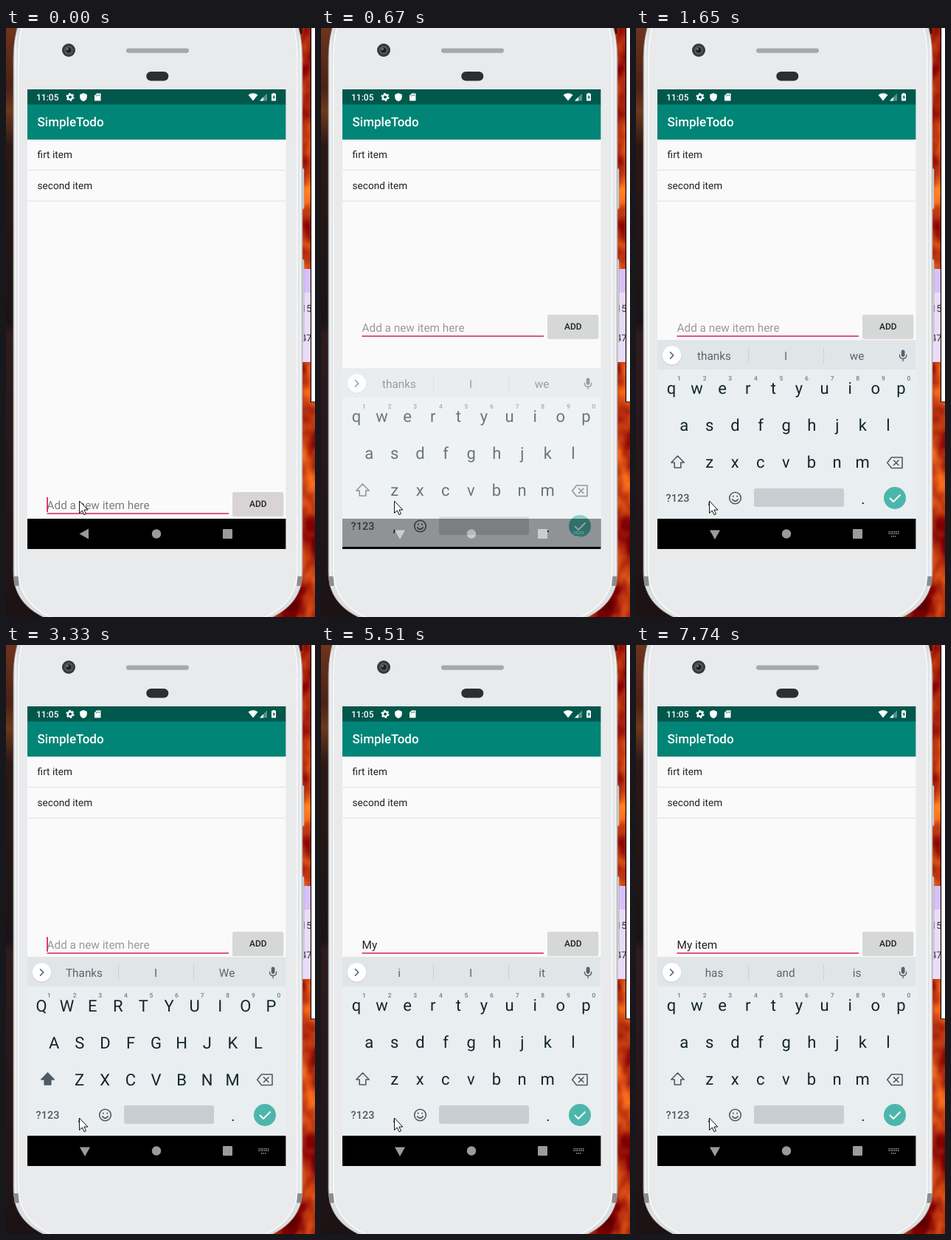
These frames come from a looping animation (419x797 px, 8 s). An HTML page:

```html
<!DOCTYPE html>
<html lang="en">
<head>
<meta charset="utf-8">
<title>Todo app</title>
<style>
  html, body { margin: 0; width: 100%; height: 100%; overflow: hidden; background: #1c1416; }
  svg { display: block; }
  text { font-family: Roboto, sans-serif; white-space: pre; text-rendering: geometricPrecision; }
  .mid { text-anchor: middle; }
  .medium { font-weight: 500; }
  .line { fill: none; stroke-linecap: round; stroke-linejoin: round; }
</style>
</head>
<body>
<svg width="419" height="797" viewBox="0 0 419 797">
  <defs>
    <filter id="fire" x="0" y="0" width="1" height="1" color-interpolation-filters="sRGB">
      <feTurbulence type="fractalNoise" baseFrequency=".03 .02" numOctaves="3" seed="8"/>
      <feColorMatrix values="1 0 0 0 .24  .9 0 0 0 -.24  .2 0 0 0 -.04  0 0 0 0 1"/>
    </filter>
    <linearGradient id="dusk" x2="0" y2="1">
      <stop offset="0" stop-color="#6e341d"/><stop offset=".1" stop-color="#4a2216"/>
      <stop offset=".14" stop-color="#6e381c"/><stop offset=".2" stop-color="#2b1815"/>
      <stop offset=".5" stop-color="#1a1315"/><stop offset=".52" stop-color="#2e1b1e"/>
      <stop offset="1" stop-color="#1c1214"/>
    </linearGradient>
    <linearGradient id="rim">
      <stop offset="0" stop-color="#b4b6b8"/><stop offset=".006" stop-color="#f4f5f6"/>
      <stop offset=".015" stop-color="#dcdee0"/><stop offset=".985" stop-color="#dcdee0"/>
      <stop offset=".994" stop-color="#f4f5f6"/><stop offset="1" stop-color="#b4b6b8"/>
    </linearGradient>
    <linearGradient id="shade" x2="0" y2="1">
      <stop offset="0" stop-opacity="0"/><stop offset="1" stop-opacity=".12"/>
    </linearGradient>
    <clipPath id="screen"><path d="M29 83H379.4V705H29z"/></clipPath>
  </defs>

  <!-- desktop -->
  <rect width="200" height="797" fill="url(#dusk)"/>
  <rect x="200" width="219" height="797" filter="url(#fire)"/>
  <path d="M365 0h37v8h-37z" fill="#3b1712"/>
  <text x="372" y="2" font-size="11" fill="#fff">start</text>
  <path d="M398 326h15v126h-15z" fill="#e9dcf8"/>
  <path d="M398 326h15v32h-15z" fill="#d8c0fb"/>
  <text x="400" y="384" font-size="13" fill="#333">15</text>
  <text x="400" y="424" font-size="13" fill="#333">47</text>
  <path d="M413.5 -2H430V506H413.5z" fill="#fff" stroke="#0b0505" stroke-width="1.2"/>

  <!-- phone -->
  <g stroke="#a6a8aa" stroke-width=".7" fill="#dcdee0">
    <rect x="398" y="190" width="6" height="55" rx="2"/>
    <rect x="398" y="313" width="6" height="112" rx="2"/>
    <path d="M18-10C12 10 10 25 10 45V735C10 765 24 786 57 800H355C388 786 402 765 402 735V45C402 25 400 10 394-10z" fill="url(#rim)"/>
  </g>
  <path d="M10.5 742h7v13h-6zM394.5 742h7l-1 13h-6z" fill="#8b8d90"/>
  <path d="M24-10C18 10 17 25 17 45V735C17 764 32 785 64 799H348C380 785 395 764 395 735V45C395 25 394 10 388-10z" fill="#e8eaec" stroke="#fafbfb" stroke-width="1.5"/>
  <circle cx="85" cy="30" r="9" fill="#37383a"/>
  <circle cx="85" cy="30" r="6" fill="#565759"/>
  <circle cx="85" cy="30" r="3.5" fill="#1d1e20"/>
  <circle cx="83.5" cy="28.5" r="1.3" fill="#8d9094"/>
  <rect x="163" y="27.5" width="85" height="6.2" rx="3.1" fill="#a6a8aa"/>
  <rect x="190.3" y="59" width="30" height="12.5" rx="6.2" fill="#2d2e30"/>

  <g clip-path="url(#screen)">
    <path d="M29 83H380V705H29z" fill="#fafafa"/>
    <path d="M29 83H380V104H29z" fill="#00574b"/>
    <path d="M29 103.4H380V151H29z" fill="#008577"/>
    <path d="M29 192.4H380M29 234.2H380" stroke="#dcdcdc" stroke-width=".9"/>

    <!-- status bar -->
    <g fill="#fff">
      <text class="medium" x="41" y="97.7" font-size="12">11:05</text>
      <circle cx="87" cy="93.5" r="3.2" fill="none" stroke="#fff" stroke-width="2.4"/>
      <circle cx="87" cy="93.5" r="4.9" fill="none" stroke="#fff" stroke-width="1.4" stroke-dasharray="2.56"/>
      <path d="M105 88l4.8 2v3.5q0 4-4.8 5.8q-4.8-1.8-4.8-5.8V90z"/>
      <path d="M123 88.500h5.500v10h-8.500v-7z"/>
      <path d="M122.500 90.500v2M124.500 90v2M126.500 90v2" stroke="#00574b" stroke-width=".8"/>
      <path d="M328.500 90.500q6.500-4.600 13 0L335 98.500z"/>
      <path d="M354 88.500v10h-10z" opacity=".35"/>
      <path d="M349 93.500v5h-5z"/>
      <path d="M361.500 88h3v1h1.500v9.500h-6V89h1.500z"/>
      <path d="M363.800 90.500l-2.300 3.500h1.300v3l2.200-3.700h-1.200z" fill="#00574b"/>
    </g>
    <text class="medium" x="42.6" y="133.3" font-size="17" fill="#fff">SimpleTodo</text>
    <g font-size="13.62" fill="#212121">
      <text x="42.6" y="176.2">firt item</text>
      <text x="42.6" y="217.9">second item</text>
    </g>

    <!-- entry row -->
    <g id="entry">
      <text id="typed" x="55.5" y="410.5" font-size="15.33"></text>
      <path id="underline" stroke="#212121" stroke-width=".9"/>
      <rect id="caret" y="395" width="1.7" height="20" fill="#d81b60"/>
      <path d="M55.500 417H302" stroke="#d81b60" stroke-width="1.5"/>
      <rect x="307" y="389" width="69.3" height="31.7" rx="2" opacity=".18"/>
      <rect id="button" x="307" y="388" width="69" height="32" rx="2"/>
      <text class="mid medium" x="341.7" y="408.4" font-size="11.92" fill="#212121">ADD</text>
    </g>

    <!-- navigation bar -->
    <path d="M29 664H380V705H29z"/>
    <g fill="#999b9c">
      <path id="back" d="M99.500 684.500l12.500-7v14z"/>
      <circle cx="204" cy="684.5" r="6.2"/>
      <rect x="294" y="678" width="13" height="13" rx="1"/>
      <path id="imeIcon" d="M342.500 681.800h14M342.500 684.300h14M346 687.700h7" fill="none" stroke="#999b9c" stroke-width="1.4" stroke-dasharray="1.5 1"/>
    </g>

    <!-- keyboard -->
    <g id="keyboard">
      <path d="M29 421H380V424H29z" fill="url(#shade)"/>
      <path d="M29 424H380V664H29z" fill="#e9eef0"/>
      <path d="M29 424H380V462H29z" fill="#e0e5e8"/>
      <path d="M152.500 432v22M254.500 432v22" stroke="#cbd1d5"/>
      <circle cx="48.5" cy="443.8" r="13" fill="#000" opacity=".12"/>
      <circle cx="48.5" cy="443" r="12.7" fill="#fff"/>
      <path class="line" d="M46.500 438.800l4.300 4.200l-4.300 4.200" stroke="#566269" stroke-width="1.6"/>
      <rect x="359.7" y="435.5" width="4.8" height="9.5" rx="2.4" fill="#566269"/>
      <path class="line" d="M357.500 442.500q0 5 4.600 5t4.600-5M362.100 447.500v3" stroke="#566269" stroke-width="1.4"/>
      <g id="hints" class="mid" font-size="15.33" fill="#5a666c"></g>
      <g id="digits" class="mid medium" font-size="8.5" fill="#727e84"></g>
      <g id="keys" class="mid" font-size="22" fill="#12262e"></g>
      <path id="shift" class="line" d="M56.500 579l8.700 9h-4.400v7h-8.600v-7h-4.400z" stroke="#4d5b62" stroke-width="1.6"/>
      <path class="line" d="M346.500 581h14.500v14.500h-14.500l-5.800-7.250zM349.500 585l6.500 6.500M356 585l-6.500 6.500" stroke="#4d5b62" stroke-width="1.6"/>
      <text class="mid medium" x="56.5" y="641" font-size="14.5" fill="#4d5b62">?123</text>
      <text class="mid" x="99.5" y="643" font-size="20" fill="#12262e">,</text>
      <circle cx="134.5" cy="636" r="7.8" fill="none" stroke="#4d5b62" stroke-width="1.6"/>
      <path class="line" d="M131.800 633.500v.2M137.200 633.500v.2M130.800 638q3.700 4.600 7.400 0" stroke="#4d5b62" stroke-width="1.9"/>
      <rect x="160" y="623" width="122" height="25" rx="3" fill="#c8cdd1"/>
      <text class="mid" x="308" y="644" font-size="20" fill="#12262e">.</text>
      <circle cx="351" cy="636" r="15" fill="#4db6ac"/>
      <path class="line" d="M344.500 636.500l4.500 4.500l9-9" stroke="#fff" stroke-width="1.9"/>
    </g>
  </g>
  <path d="M99.500 640v16.500l3.800-3.500l2.700 5.700l2.500-1.200l-2.600-5.500h5z" fill="#fff" stroke="#111"/>
</svg>

<script>
const LOOP = 8000, PLACEHOLDER = 'Add a new item here';
const $ = id => document.getElementById(id);

function addText(parent, x, y, content = '') {
  const node = document.createElementNS('http://www.w3.org/2000/svg', 'text');
  node.setAttribute('x', x);
  node.setAttribute('y', y);
  node.textContent = content;
  return parent.appendChild(node);
}
function set(id, attributes) {
  for (const name in attributes) $(id).setAttribute(name, attributes[name]);
}

const PITCH = 34.6;
const keys = [['qwertyuiop', 48], ['asdfghjkl', 65.2], ['zxcvbnm', 99.6]].flatMap(([letters, left], row) =>
  [...letters].map((letter, i) => ({
    letter, base: 494.5 + 50 * row,
    node: addText($('keys'), left + PITCH * i, 0)
  })));
[...'1234567890'].forEach((digit, i) => addText($('digits'), 58.5 + PITCH * i, 477, digit));
const hintNodes = [106, 203, 299.6].map(x => addText($('hints'), x, 449));

// Each step changes only the listed parts of the state.
const steps = [
  [0, { text: '', caret: 1, composing: '', entryY: 240, hintColor: '#7d7d7d', button: '#d8d4d6',
        backTurn: 0, ime: 0, rise: 48, fade: 0, upper: false, hints: ['thanks', 'I', 'we'] }],
  [120, { backTurn: -45, ime: .5, hintColor: '#999' }],
  [240, { backTurn: -90, ime: 1 }],
  [390, { entryY: 0, button: '#d6d7d7' }],
  [510, { rise: 46, fade: .15 }],
  [670, { rise: 38, fade: .62, caret: 0 }],
  [810, { rise: 0, fade: 1 }],
  [960, { caret: 1 }],
  [1650, { caret: 0 }],
  [3330, { caret: 1, upper: true, hints: ['Thanks', 'I', 'We'] }],
  [3480, { text: 'M', composing: 'M', upper: false, hints: ['M', 'My', 'Me'] }],
  [4230, { text: 'My ', composing: '', hints: ['husband', 'phone', 'boyfriend'] }],
  [4760, { caret: 0 }],
  [5510, { hints: ['i', 'I', 'it'] }],
  [5660, { text: 'My i', composing: 'i', caret: 1, hints: ['it', 'i', 'its'] }],
  [5810, { text: 'My ite', composing: 'ite', hints: ['items', 'item', 'itemized'] }],
  [6060, { text: 'My item', composing: 'item' }],
  [6490, { caret: 0 }],
  [7060, { caret: 1 }],
  [7610, { caret: 0 }],
  [7740, { composing: '', hints: ['has', 'and', 'is'] }]
];

function draw(s) {
  const typed = $('typed'), left = 55.5;
  typed.textContent = s.text || PLACEHOLDER;
  typed.setAttribute('fill', s.text ? '#212121' : s.hintColor);
  const widthTo = n => n ? typed.getSubStringLength(0, n) : 0;
  const end = left + widthTo(s.text.length);
  const start = left + widthTo(s.text.length - s.composing.length);
  set('underline', { d: s.composing ? `M${start} 412.5H${end}` : '' });
  set('caret', { x: end - .3, opacity: s.caret });
  set('entry', { transform: `translate(0 ${s.entryY})` });
  set('button', { fill: s.button });
  set('back', { transform: `rotate(${s.backTurn} 107 684.5)` });
  set('imeIcon', { opacity: s.ime });
  set('keyboard', { transform: `translate(0 ${s.rise})`, opacity: s.fade });
  set('shift', { style: `fill:${s.upper ? '#4d5b62' : 'none'}` });
  hintNodes.forEach((node, i) => node.textContent = s.hints[i]);
  for (const { letter, base, node } of keys) {
    node.textContent = s.upper ? letter.toUpperCase() : letter;
    node.setAttribute('y', base + (s.upper ? 1.5 : 0));
  }
}

let shown = 0;
function tick() {
  const time = performance.now() % LOOP;
  const past = steps.filter(([at]) => at <= time);
  if (past.length !== shown) {
    shown = past.length;
    draw(Object.assign({}, ...past.map(step => step[1])));
  }
  requestAnimationFrame(tick);
}
tick();
</script>
</body>
</html>
```
